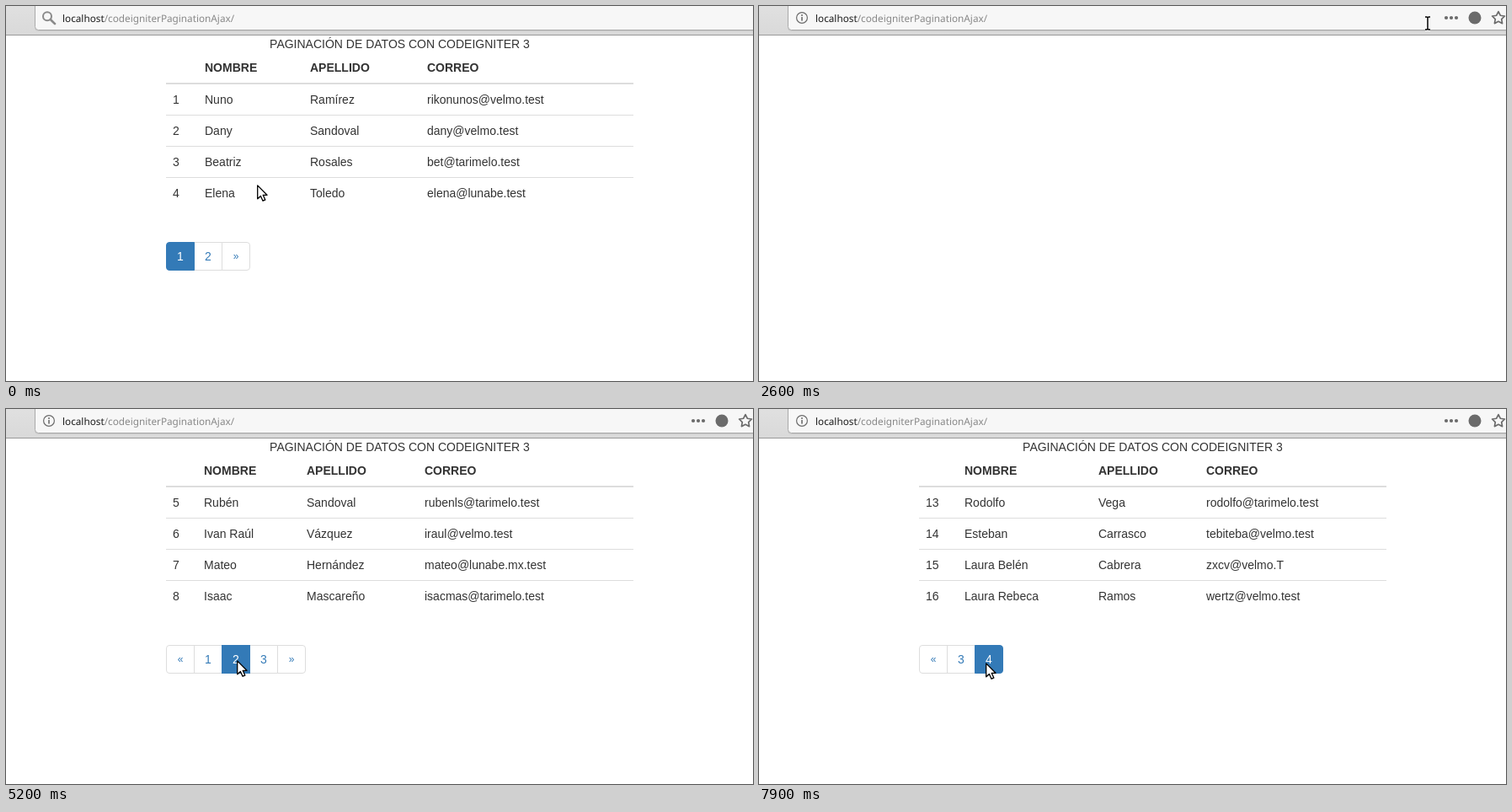
Write an HTML page that moves like this. It is 887x445 px and loops after 8 s.

```html
<!DOCTYPE html>
<html lang="es">
<head>
<meta charset="utf-8">
<title>Paginación</title>
<style>
html, body { margin: 0; width: 100%; height: 100%; overflow: hidden; background: #fff; }
body { position: relative; font: 14px/20px "Liberation Sans", Arial, sans-serif; color: #333; }
svg { position: absolute; z-index: 1; left: 0; top: 0; width: 887px; height: 445px; }
.url { font: 11.75px "Noto Sans", "Open Sans", sans-serif; text-rendering: geometricPrecision; }
#page { position: absolute; z-index: 0; left: 190px; top: 35px; width: 555px; }
.title { height: 20px; text-align: center; }
.row { position: relative; height: 36px; border-top: 1px solid #ddd; }
.row span { position: absolute; top: 8px; white-space: nowrap; }
.head { height: 36px; border: 0; font-weight: bold; }
.head + .row { border-top-width: 2px; }
.pager { position: absolute; left: 0; top: 245px; width: 300px; }
.pager a { position: relative; float: left; width: 8px; height: 20px; padding: 6px 12px; margin-left: -1px; border: 1px solid #ddd; background: #fff; color: #337ab7; text-align: center; }
.pager a:first-child { margin-left: 0; border-radius: 4px 0 0 4px; }
.pager a:last-child { border-radius: 0 4px 4px 0; }
.pager .step { font-size: 12px; }
.pager .on { z-index: 3; background: #337ab7; border-color: #337ab7; color: #fff; }
.pager .hot { z-index: 2; background: #eee; color: #23527c; }
.pager .focus { outline: 1px dotted #333; outline-offset: -2px; }
</style>
</head>
<body>
<div id="page"></div>
<svg viewBox="0 0 887 445">
  <defs>
    <linearGradient id="shade" x1="0" y1="0" x2="0" y2="1">
      <stop offset="0" stop-color="#e0e0e0"/><stop offset="1" stop-color="#d9d9d9"/>
    </linearGradient>
  </defs>
  <rect width="887" height="34" fill="url(#shade)"/>
  <rect y="34" width="887" height="1" fill="#999"/>
  <rect x="34.5" y="-9.5" width="870" height="39" rx="4" fill="none" stroke="#000" stroke-opacity=".08"/>
  <rect id="box" x="34.5" y="-9.5" width="870" height="38" rx="4" fill="#f7f7f7" stroke="#aaa"/>
  <text class="url" x="67" y="19" fill="#1c1c1c">localhost<tspan id="path" fill="#888">/codeigniterPaginationAjax/</tspan></text>
  <g id="search" fill="none" stroke="#8a8a8a" stroke-width="2">
    <circle cx="49" cy="12.3" r="5"/>
    <path d="M52.8 16l5.2 5.2" stroke-width="2.6" stroke-linecap="round"/>
  </g>
  <g id="info" fill="#6b6b6b">
    <circle cx="51" cy="14" r="6.4" fill="none" stroke="#6b6b6b" stroke-width="1.2"/>
    <circle cx="51" cy="11" r="1"/><rect x="50.2" y="13" width="1.6" height="4.6"/>
    <circle cx="816" cy="14" r="2.1"/><circle cx="822" cy="14" r="2.1"/><circle cx="828" cy="14" r="2.1"/>
    <circle cx="850" cy="14" r="7.5"/>
    <path id="star" fill="none" stroke="#6b6b6b" stroke-width="1.7" stroke-linejoin="round"/>
  </g>
  <g id="arrow" stroke-linejoin="round">
    <path d="M1.5 2V18L5.3 14.6L7.8 20.2L10.8 18.8L8.3 13.4H13Z" fill="#000" opacity=".18"/>
    <path d="M.7 .9V16.8L4.4 13.4L7 19.2L9.8 17.9L7.2 12.3H12Z" fill="#fff" stroke="#000" stroke-width="1.3"/>
  </g>
  <g id="beam" fill="none">
    <path d="M-3-7H-1L0-6L1-7H3M0-6V7M-3 8H-1L0 7L1 8H3" stroke="#fff" stroke-width="3.4"/>
    <path d="M-3-7H-1L0-6L1-7H3M0-6V7M-3 8H-1L0 7L1 8H3" stroke="#000" stroke-width="1.5"/>
  </g>
  <g id="hand" stroke="#000" stroke-linejoin="round">
    <path d="M-1.5 8.5V1A1.5 1.5 0 0 1 1.5 1V5.4Q3.2 4.6 4.5 5.8Q6.2 5.2 7.5 6.4Q9.2 5.9 10.3 7.2Q11.6 7.8 11.3 10L10.4 12.6V15.5H.5V13.5L-3.2 9.2Q-3.9 7.3-2.4 7.3Z" fill="#fff" stroke-width="1.3"/>
    <path d="M2.5 10V13M5 10V13M7.5 10V13" stroke-width=".9" stroke-dasharray="1 1"/>
  </g>
</svg>
<script>
const LOOP = 8000;
const $ = id => document.getElementById(id);
const V = "@velmo.test", T = "@tarimelo.test", L = "@lunabe.test";

// cols: x of each column; pager: labels, with the active one at index on
const pages = [
  { first: 1, cols: [236, 361, 500], pager: "12»", on: 0, rows: [
    ["Nuno", "Ramírez", "rikonunos" + V], ["Dany", "Sandoval", "dany" + V],
    ["Beatriz", "Rosales", "bet" + T], ["Elena", "Toledo", "elena" + L]] },
  { first: 5, cols: [235, 357, 497], pager: "«123»", on: 2, rows: [
    ["Rubén", "Sandoval", "rubenls" + T], ["Ivan Raúl", "Vázquez", "iraul" + V],
    ["Mateo", "Hernández", "mateo@lunabe.mx.test"], ["Isaac", "Mascareño", "isacmas" + T]] },
  { first: 9, cols: [247, 368, 502], pager: "«234»", on: 2, rows: [
    ["Teodoro", "Casanueva", "teod" + V], ["Rebeca", "Torres", "rvtorres" + V],
    ["Gonzalo", "Pérez", "gperez" + L], ["Eva", "Cabrera", "ecabrera" + T]] },
  { first: 13, cols: [244, 403, 531], pager: "«34", on: 2, rows: [
    ["Rodolfo", "Vega", "rodolfo" + T], ["Esteban", "Carrasco", "tebiteba" + V],
    ["Laura Belén", "Cabrera", "zxcv@velmo.T"], ["Laura Rebeca", "Ramos", "wertz" + V]] }
];

// each step changes only the fields it names; page -1 is blank, hot is the hovered link
const steps = [
  { t: 0, cur: "arrow", x: 298, y: 212, page: 0, bar: "typed", hot: -1, focus: false },
  { t: 200, x: 286, y: 172 },
  { t: 300, x: 277, y: 141 },
  { t: 600, x: 277, y: 84 },
  { t: 700, cur: "beam", x: 280, y: 20 },
  { t: 1100, x: 279 },
  { t: 1300, bar: "edit" },
  { t: 2400, bar: "typed" },
  { t: 2500, bar: "loaded", x: 560 },
  { t: 2600, page: -1, x: 794 },
  { t: 3100, page: 0, cur: "arrow", x: 333, y: 291 },
  { t: 3200, x: 318, y: 304 },
  { t: 3300, x: 296, y: 310 },
  { t: 3400, cur: "hand", x: 273, y: 309, hot: 2 },
  { t: 3600, x: 244, y: 303, hot: 1 },
  { t: 4400, x: 245 },
  { t: 4600, focus: true },
  { t: 4800, page: 1, focus: false },
  { t: 5200, cur: "arrow", x: 274, y: 298, hot: -1 },
  { t: 5300, x: 279, y: 299 },
  { t: 5400, cur: "hand", x: 298, y: 299, hot: 3 },
  { t: 5500, x: 308, y: 298 },
  { t: 5900, focus: true },
  { t: 6100, page: 2, focus: false },
  { t: 7300, focus: true },
  { t: 7400, page: 3, cur: "arrow", hot: -1, focus: false },
  { t: 7800, x: 287, y: 300 },
  { t: 7900, x: 269, y: 301 }
];
const states = [];
steps.forEach((s, i) => states.push({ ...states[i - 1], ...s }));

const cell = (x, text) => `<span style="left:${x - 190}px">${text}</span>`;
const row = (cells, cols, type = "") =>
  `<div class="row ${type}">${cells.map((c, i) => cell(cols[i], c)).join("")}</div>`;

function pageHtml({ page, hot, focus }) {
  if (page < 0) return "";
  const p = pages[page], cols = [198, ...p.cols];
  const links = [...p.pager].map((label, i) => {
    const type = [
      "«»".includes(label) && "step",
      i === p.on && "on",
      i === hot && "hot",
      i === hot && focus && "focus"
    ].filter(Boolean).join(" ");
    return `<a class="${type}">${label}</a>`;
  });
  return `<div class="title">PAGINACIÓN DE DATOS CON CODEIGNITER 3</div>` +
    row(["", "NOMBRE", "APELLIDO", "CORREO"], cols, "head") +
    p.rows.map((r, i) => row([p.first + i, ...r], cols)).join("") +
    `<div class="pager">${links.join("")}</div>`;
}

const show = (id, on) => $(id).setAttribute("visibility", on ? "visible" : "hidden");

function draw(s) {
  $("page").innerHTML = pageHtml(s);
  show("search", s.bar !== "loaded");
  show("info", s.bar === "loaded");
  $("box").setAttribute("stroke", s.bar === "edit" ? "#5294e2" : "#aaa");
  $("path").setAttribute("fill", s.bar === "edit" ? "#1c1c1c" : "#888");
  for (const id of ["arrow", "beam", "hand"]) show(id, id === s.cur);
  $(s.cur).setAttribute("transform", `translate(${s.x} ${s.y})`);
}

const star = Array.from({ length: 10 }, (_, i) => {
  const a = i * Math.PI / 5, r = i % 2 ? 3.9 : 7.8;
  return `${878 + r * Math.sin(a)} ${14.4 - r * Math.cos(a)}`;
});
$("star").setAttribute("d", `M${star.join("L")}Z`);

let last;
const start = performance.now();
function tick() {
  const t = (performance.now() - start) % LOOP;
  const s = states.filter(v => v.t <= t).pop();
  if (s !== last) draw(last = s);
  requestAnimationFrame(tick);
}
tick();
</script>
</body>
</html>
```
